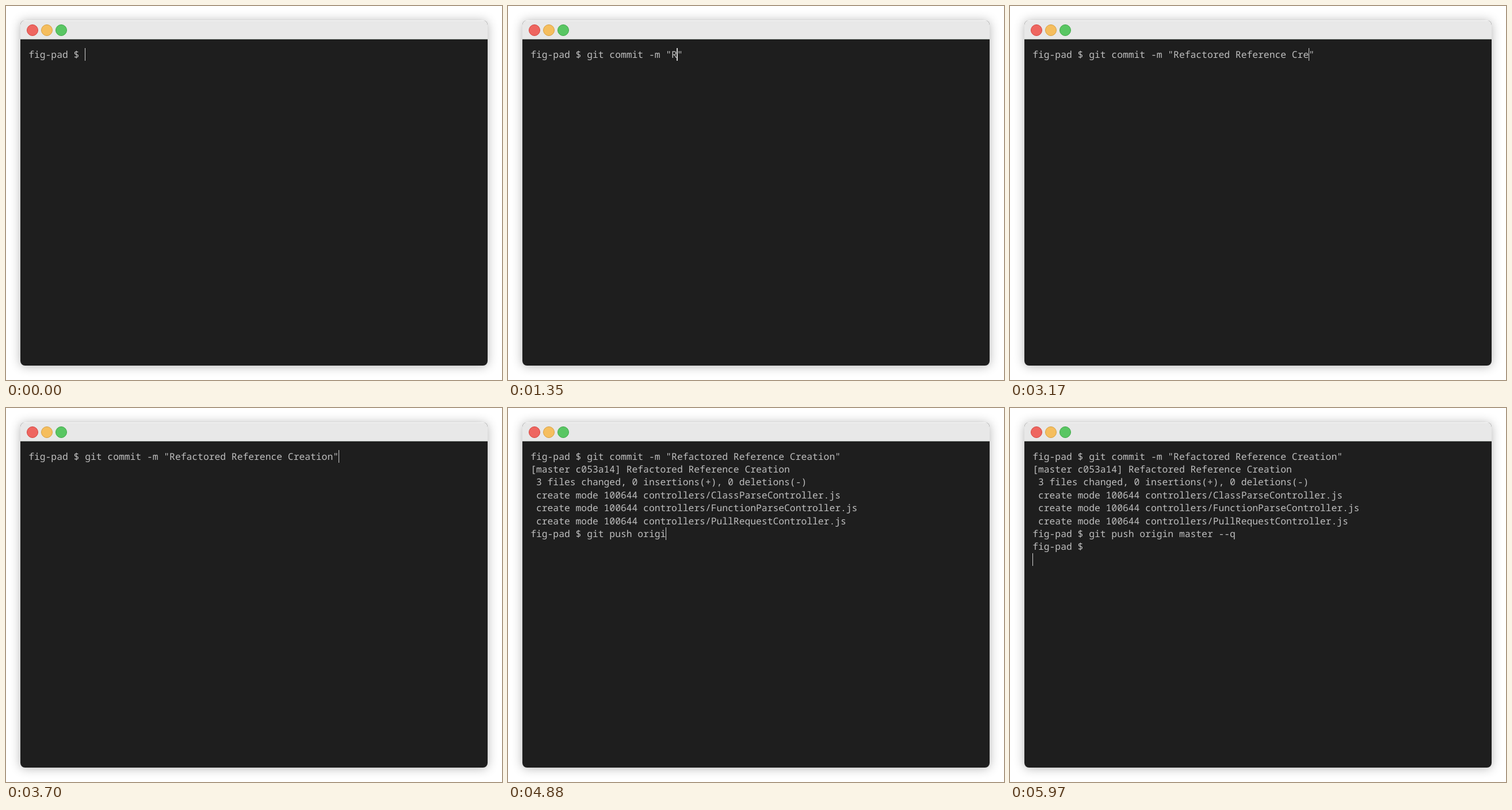
An HTML page that plays this animation: 862x649 px, repeating every 6.05 s.

```html
<!DOCTYPE html>
<html lang="en">
<head>
<meta charset="utf-8">
<title>Terminal</title>
<style>
  html, body { margin: 0; width: 100%; height: 100%; overflow: hidden; background: #fff; }
  #win {
    position: absolute; left: 25px; top: 25px; width: 812px; height: 599px;
    border-radius: 8px; overflow: hidden; background: #1e1e1e;
  }
  #shadow {
    position: absolute; left: 25px; top: 25px; width: 812px; height: 599px;
    border-radius: 8px; box-shadow: 0 1px 18px rgba(0, 0, 0, .3);
  }
  #bar {
    height: 33px; box-sizing: border-box; background: #e8e8e8;
    border-top: 1.5px solid #f6f6f6; border-bottom: 1px solid #b4bab5;
  }
  #bar b {
    position: absolute; top: 7px; width: 20px; height: 20px;
    box-sizing: border-box; border-radius: 50%; border: 1px solid;
  }
  #term {
    position: absolute; left: 14.2px; top: 47.5px; margin: 0; color: #bfbfbf;
    font: 16.33px/22.4px "Noto Sans Mono", "DejaVu Sans Mono", monospace;
    font-variant-ligatures: none; text-rendering: geometricPrecision;
  }
  #text { white-space: pre; }
  #cursor {
    position: absolute; left: 0; top: 0; width: 1.5px; height: 22.4px;
    margin-left: -1.5px; background: #d0d0d0;
  }
</style>
</head>
<body>
<div id="shadow"></div>
<div id="win">
  <div id="bar">
    <b style="left:11px;background:#ee6660;border-color:#d4453f"></b>
    <b style="left:36px;background:#f5be5e;border-color:#d79f42"></b>
    <b style="left:61px;background:#59c663;border-color:#40a849"></b>
  </div>
  <div id="term"><div id="text"></div><div id="cursor"></div></div>
</div>
<script>
const LOOP = 6050, LINE = 22.4;
const PROMPT = 'fig-pad $ ';
const LEFT = '\u2190', RIGHT = '\u2192';

const mode = name => ` create mode 100644 controllers/${name}Controller.js\n`;
const output = '[master c053a14] Refactored Reference Creation\n' +
  ' 3 files changed, 0 insertions(+), 0 deletions(-)\n' +
  ['ClassParse', 'FunctionParse', 'PullRequest'].map(mode).join('') + PROMPT;

const keys = [
  ...'git commit -m ""', LEFT, ...'Refactored Reference Creation', RIGHT, '\n', output,
  ...'git push origin master --q', '\n', PROMPT, '\n'
];

// Each state holds the text before and after the cursor.
const states = [[PROMPT, '']];
for (const key of keys) {
  const [before, after] = states[states.length - 1];
  states.push(
    key === LEFT ? [before.slice(0, -1), before.slice(-1) + after] :
    key === RIGHT ? [before + after[0], after.slice(1)] :
    [before + key, after]);
}

// Bursts of evenly spaced key presses: first time, last time, count.
const times = [
  [80, 660, 9], [740, 1270, 8], [1350, 1910, 8], [1980, 2540, 8],
  [2620, 3170, 8], [3250, 3800, 8], [3880, 4110, 4], [4185, 4410, 4],
  [4490, 4880, 6], [4920, 5080, 3], [5160, 5730, 9], [5810, 5970, 3]
].flatMap(([from, to, n]) =>
  Array.from({ length: n }, (_, i) => Math.round(from + (to - from) * i / (n - 1))));

const text = document.getElementById('text');
const cursor = document.getElementById('cursor');
let shown = -1;

function draw() {
  const t = performance.now() % LOOP;
  const step = times.filter(time => time <= t).length;
  if (step !== shown) {
    shown = step;
    const [before, after] = states[step];
    const rows = before.split('\n');
    text.textContent = before + after;
    cursor.style.left = `calc(${rows[rows.length - 1].length} * 1ch + 1px)`;
    cursor.style.top = (rows.length - 1) * LINE + 'px';
  }
  requestAnimationFrame(draw);
}
draw();
</script>
</body>
</html>
```
